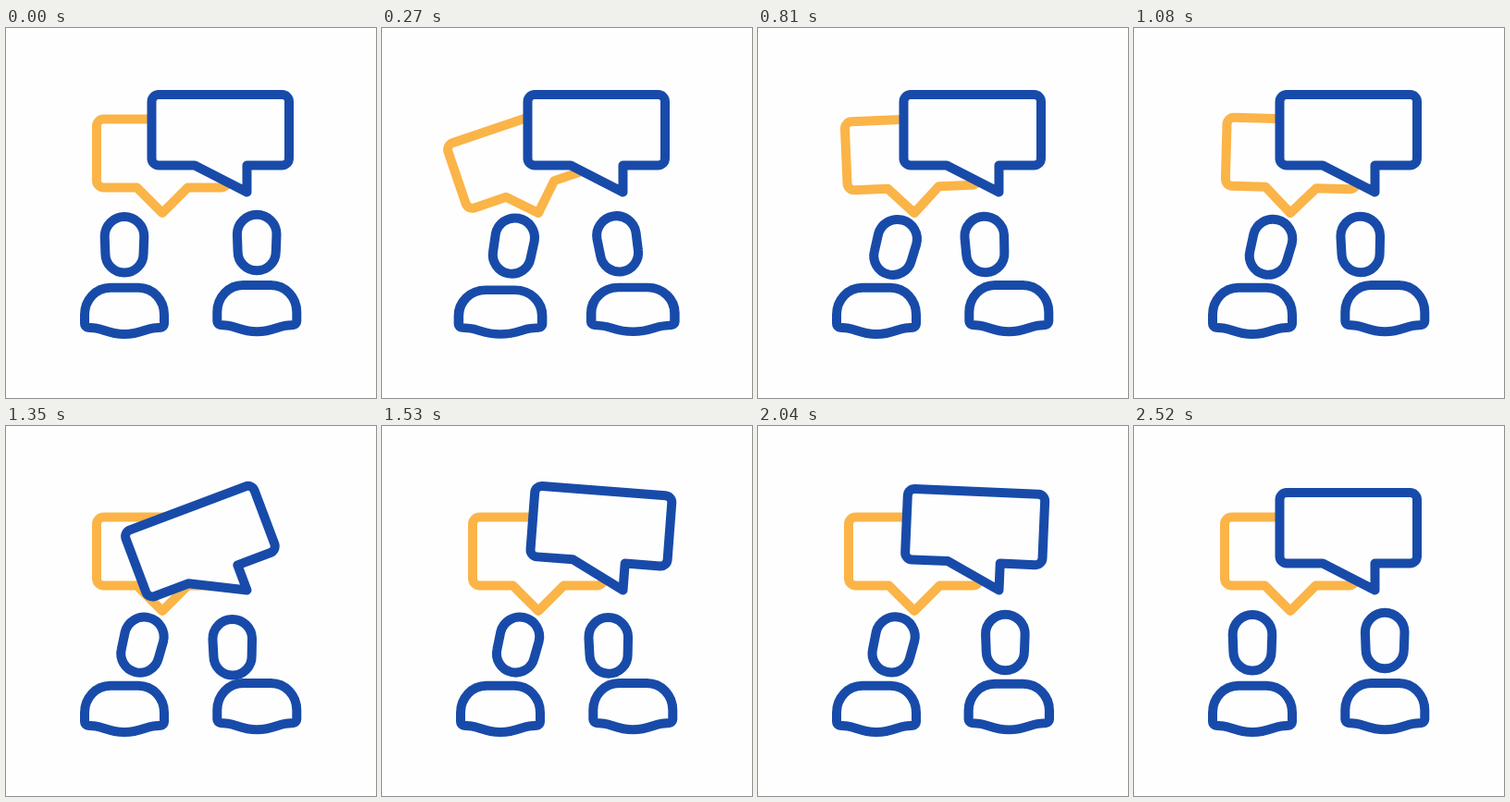
These frames come from a looping animation (400x400 px, 4.55 s). An HTML page with a canvas:

```html
<!DOCTYPE html>
<html lang="en">
<head>
<meta charset="utf-8">
<title>Conversation</title>
<style>
html, body { margin: 0; width: 100%; height: 100%; overflow: hidden; background: #fefefe; }
canvas { display: block; width: 100vmin; height: 100vmin; }
</style>
</head>
<body>
<canvas id="stage" width="400" height="400"></canvas>
<script>
const ctx = document.getElementById('stage').getContext('2d');
const LOOP = 4550, STEP = 30, END = 2520;
const BLUE = '#184ba9', AMBER = '#fbb447', WHITE = '#fefefe';

const clamp = u => Math.max(0, Math.min(1, u));
const linear = (t, from, to) => clamp((t - from) / (to - from));
const ramp = (t, from, to) => (1 - Math.cos(Math.PI * linear(t, from, to))) / 2;
const pulse = (t, from, to) => Math.sin(Math.PI * linear(t, from, to)) ** 2;

// Rounded box around a tail; the tail runs from right to left along the base.
function bubble(left, top, right, bottom, tailRight, tailX, tailY, tailLeft) {
  const p = new Path2D(), r = 7.5;
  p.moveTo(tailLeft, bottom);
  p.arcTo(left, bottom, left, top, r);
  p.arcTo(left, top, right, top, r);
  p.arcTo(right, top, right, bottom, r);
  p.arcTo(right, bottom, left, bottom, r);
  p.lineTo(tailRight, bottom);
  p.lineTo(tailX, tailY);
  p.closePath();
  return { path: p, x: tailX, y: tailY };
}

const amberBubble = bubble(98, 98.5, 240, 172.5, 196.5, 169, 200, 141.5);
const blueBubble = bubble(157.5, 72, 306, 148.5, 260.5, 260.5, 177.5, 204);

// Capsule, slightly narrower at the chin
const head = new Path2D();
head.arc(0, -9, 21.3, Math.PI, 0);
head.arc(0, 9.7, 20.6, 0, Math.PI);
head.closePath();

// Shoulders over a wavy hem, origin at the middle of the hem
const body = new Path2D();
body.moveTo(0, 0);
for (const side of [-1, 1]) {
  body.moveTo(0, 0);
  body.bezierCurveTo(side * 17, 0, side * 22, -5.6, side * 31, -6.5);
  body.arcTo(side * 43, -7.7, side * 43, -20, 4);
  body.lineTo(side * 43, -21);
  body.bezierCurveTo(side * 43, -37, side * 31, -50.3, side * 15, -50.3);
  body.lineTo(0, -50.3);
}

// Wind up, then a swing that dies away; in degrees
function swing(t) {
  const turns = [-20.7, 14.3, -8, 3, 0], times = [220, 485, 660, 940, 1200];
  let angle = 0, last = 0, from = 0;
  turns.forEach((a, i) => {
    angle += (a - last) * ramp(t, from, times[i]);
    last = a;
    from = times[i];
  });
  return angle;
}

function place(x, y, deg, sx, sy, paint) {
  ctx.save();
  ctx.translate(x, y);
  ctx.rotate(deg * Math.PI / 180);
  ctx.scale(sx, sy);
  paint();
  ctx.restore();
}

function drawBubble(b, color, deg) {
  place(b.x, b.y, deg, 1, 1, () => {
    ctx.translate(-b.x, -b.y);
    ctx.fillStyle = WHITE;
    ctx.strokeStyle = color;
    ctx.fill(b.path);
    ctx.stroke(b.path);
  });
}

function drawPart(path, x, y, deg, squash = 0) {
  ctx.strokeStyle = BLUE;
  place(x, y, deg, 1 + squash, 1 - squash, () => ctx.stroke(path));
}

function draw(t) {
  ctx.fillStyle = WHITE;
  ctx.fillRect(0, 0, 400, 400);
  ctx.lineWidth = 10;
  ctx.lineJoin = ctx.lineCap = 'round';

  drawBubble(amberBubble, AMBER, swing(t - 10));
  drawBubble(blueBubble, BLUE, swing(t - 1140));

  const hop = 0.05 * pulse(t, 30, 480);
  drawPart(body, 128, 331, 0, hop + 0.045 * pulse(t, 2070, 2400));
  drawPart(body, 271.3, 328.3, 0, hop + 0.04 * pulse(t, 2000, 2190));

  // Left head leans in, eases off a little, then straightens.
  const arrive = ramp(t, 20, 430);
  const lean = (15.4 - 2 * linear(t, 450, 1740)) * arrive * (1 - ramp(t, 2070, 2430));
  drawPart(head, 128 + 1.37 * lean, 234.3 + 0.012 * lean ** 2, lean);

  // Right head slides in tilted, levels out, nods and returns.
  const level = ramp(t, 570, 900);
  const shift = (24.3 + 2 * level) * arrive * (1 - ramp(t, 1860, 2100));
  const tilt = (14 - 13 * level) * arrive * (1 - ramp(t, 1860, 2040));
  const drop = 2 * arrive * (1 - ramp(t, 2020, 2200)) + 5.6 * pulse(t, 1100, 1700);
  drawPart(head, 271.2 - shift, 232 + drop, -tilt);
}

const start = performance.now();
function tick() {
  const t = (performance.now() - start) % LOOP;
  draw(Math.min(END, Math.floor(t / STEP) * STEP));
  requestAnimationFrame(tick);
}
tick();
</script>
</body>
</html>
```
